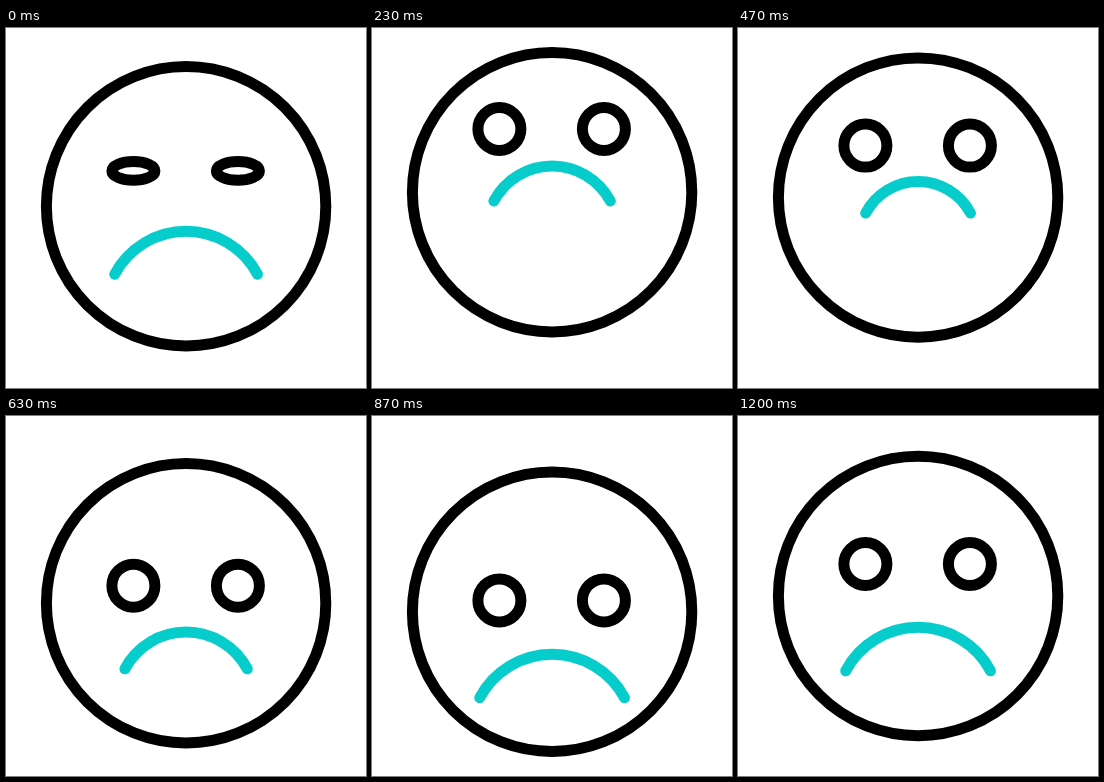
An HTML page for the animation above (1670 ms loop, 360x360 px).

```html
<!DOCTYPE html>
<html lang="en">
<meta charset="utf-8">
<title>Sad face</title>
<style>
  html, body { margin: 0; height: 100%; overflow: hidden; background: #fff; }
  svg { display: block; width: 100%; height: 100%; fill: none; stroke: #000; stroke-width: 11; stroke-linecap: round; }
  path { stroke: #06cccc; vector-effect: non-scaling-stroke; }
</style>
<svg viewBox="0 0 360 360">
  <circle id="face" cx="180.1" r="139.7"/>
  <ellipse class="eye" cx="127.4" rx="21.5"/>
  <ellipse class="eye" cx="231.9" rx="21.5"/>
  <path id="mouth" d="M-72.4 43.5A82 82 0 0 1 72.4 43.5"/>
</svg>
<script>
const LOOP = 1670, FPS = 30;
const START = -1.5, TOP = 10, END = 36; // in frames

// Gentle ease in and out from 0 to 1 between two frames.
function ease(frame, from, to) {
  const u = Math.min(1, Math.max(0, (frame - from) / (to - from)));
  return u / 2 + (1 - Math.cos(Math.PI * u)) / 4;
}

// Look up, drop below the resting place, then settle.
function nod(frame, rest, rise, drop, bottom) {
  return rest - rise * ease(frame, START, TOP)
    + (rise + drop) * ease(frame, TOP, bottom)
    - drop * ease(frame, bottom, END);
}

const face = document.getElementById('face');
const mouth = document.getElementById('mouth');
const eyes = document.querySelectorAll('.eye');

function draw() {
  const f = Math.floor((performance.now() % LOOP + 4) * FPS / 1000);

  face.setAttribute('cy', nod(f, 180, 20, 18.5, 23.5));

  for (const eye of eyes) {
    eye.setAttribute('cy', nod(f, 148, 59.5, 46, 22.5));
    eye.setAttribute('ry', 9.3 + 12.2 * ease(f, 0, 4));
  }

  const mouthY = nod(f, 211.3, 92.7, 34, 22.5);
  const size = 1 - 0.277 * (ease(f, -1, 11) - ease(f, 14, 25));
  mouth.setAttribute('transform', `translate(180.1 ${mouthY}) scale(${size})`);

  requestAnimationFrame(draw);
}
draw();
</script>
</html>
```
